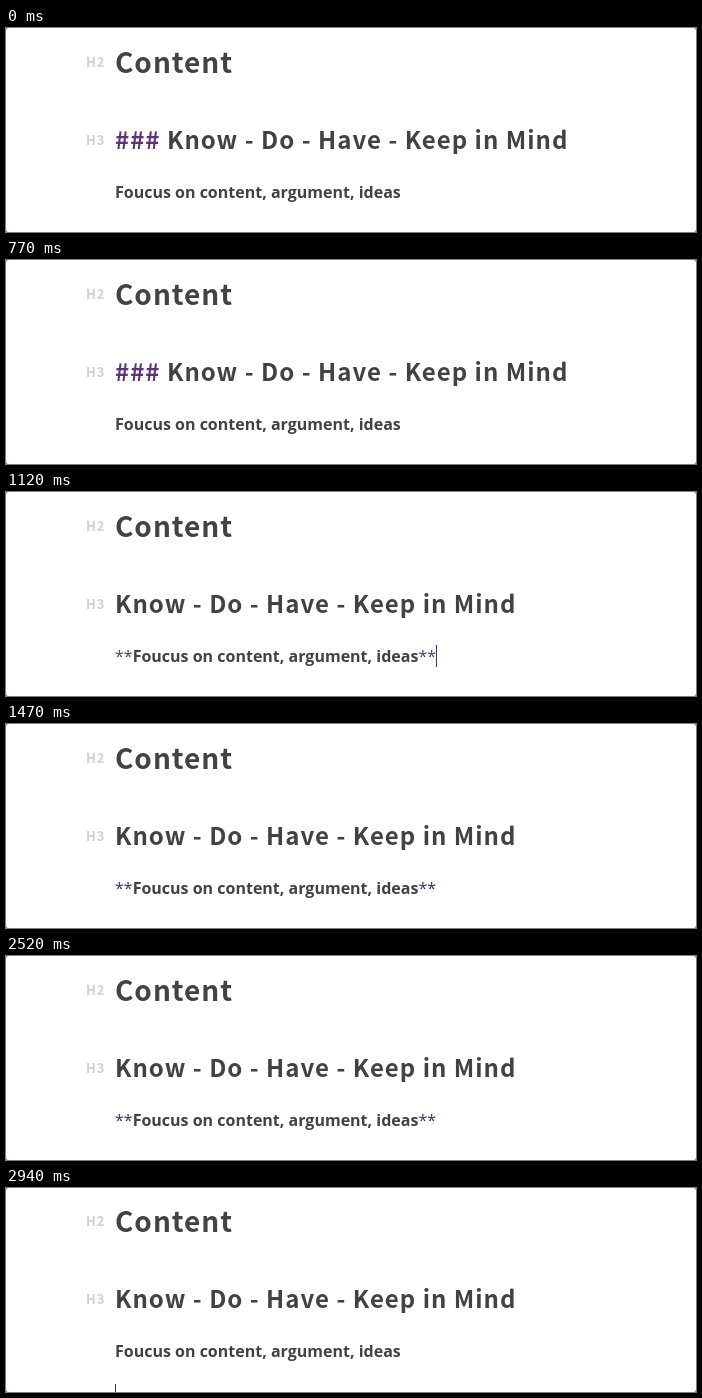
Recreate the animation shown at these times as an HTML page. Size 690x204 px, loop 3010 ms.

```html
<!DOCTYPE html>
<html lang="en">
<head>
<meta charset="utf-8">
<title>Markdown editor</title>
<style>
  html, body { margin: 0; width: 100%; height: 100%; overflow: hidden; background: #8a8a8a; }
  svg { display: block; width: 690px; height: 204px; }
  text { white-space: pre; fill: #424242; }
  .head { font-family: "Noto Sans CJK SC", "Noto Sans CJK JP", "Noto Sans CJK", "Noto Sans", sans-serif; font-weight: 700; letter-spacing: 1px; }
  .h2 { font-size: 28px; }
  .h3 { font-size: 24px; }
  .tag { font-size: 13px; fill: #d0d0d0; }
  .body { font: 700 16px "Open Sans", sans-serif; }
  .star { font-weight: 400; }
  #hash { fill: #5f3278; }
</style>
</head>
<body>
<svg viewBox="0 0 690 204">
  <rect width="690" height="204" rx="3" fill="#fff"/>
  <g id="page">
    <text class="head tag" x="80" y="39">H2</text>
    <text class="head h2" x="109" y="45">Content</text>
    <text class="head tag" x="80" y="117">H3</text>
    <text class="head h3" x="109" y="121"><tspan id="hash">### </tspan>Know - Do - Have - Keep in Mind</text>
    <text class="body" x="109" y="170"><tspan class="star">**</tspan>Foucus on content, argument, ideas<tspan class="star">**</tspan></text>
  </g>
  <rect id="caret" width="1" height="22"/>
</svg>
<script>
const LOOP = 3010;
const LEAVE_HEADING = 840, NEW_LINE = 2660;
const BLINK = [[840, 1330], [1890, 2380], [NEW_LINE, LOOP]];
const GREY = [100, 100, 120], NAVY = [52, 52, 124], INK = [66, 66, 66];

const $ = id => document.getElementById(id);
const page = $('page'), hash = $('hash'), caret = $('caret');
const stars = document.querySelectorAll('.star');
const show = (el, on) => { el.style.display = on ? '' : 'none'; };
const mix = (a, b, k) => `rgb(${a.map((v, i) => Math.round(v + (b[i] - v) * k))})`;

function draw(t) {
  const onNewLine = t >= NEW_LINE;
  const inBody = t >= LEAVE_HEADING && !onNewLine;
  const tint = Math.min(1, Math.max(0, (t - LEAVE_HEADING) / 420));

  show(hash, t < LEAVE_HEADING);
  page.setAttribute('transform', `translate(0 ${onNewLine ? -1 : 0})`);
  for (const s of stars) {
    show(s, inBody);
    s.style.fill = mix(GREY, NAVY, tint);
  }

  show(caret, BLINK.some(([on, off]) => t >= on && t < off));
  caret.setAttribute('x', onNewLine ? 109 : 430);
  caret.setAttribute('y', onNewLine ? 196 : 153);
  caret.style.fill = onNewLine ? mix(INK, INK, 0) : mix(INK, NAVY, tint);
}

const start = performance.now();
function tick() {
  draw((performance.now() - start) % LOOP);
  requestAnimationFrame(tick);
}
draw(0);
requestAnimationFrame(tick);
</script>
</body>
</html>
```
